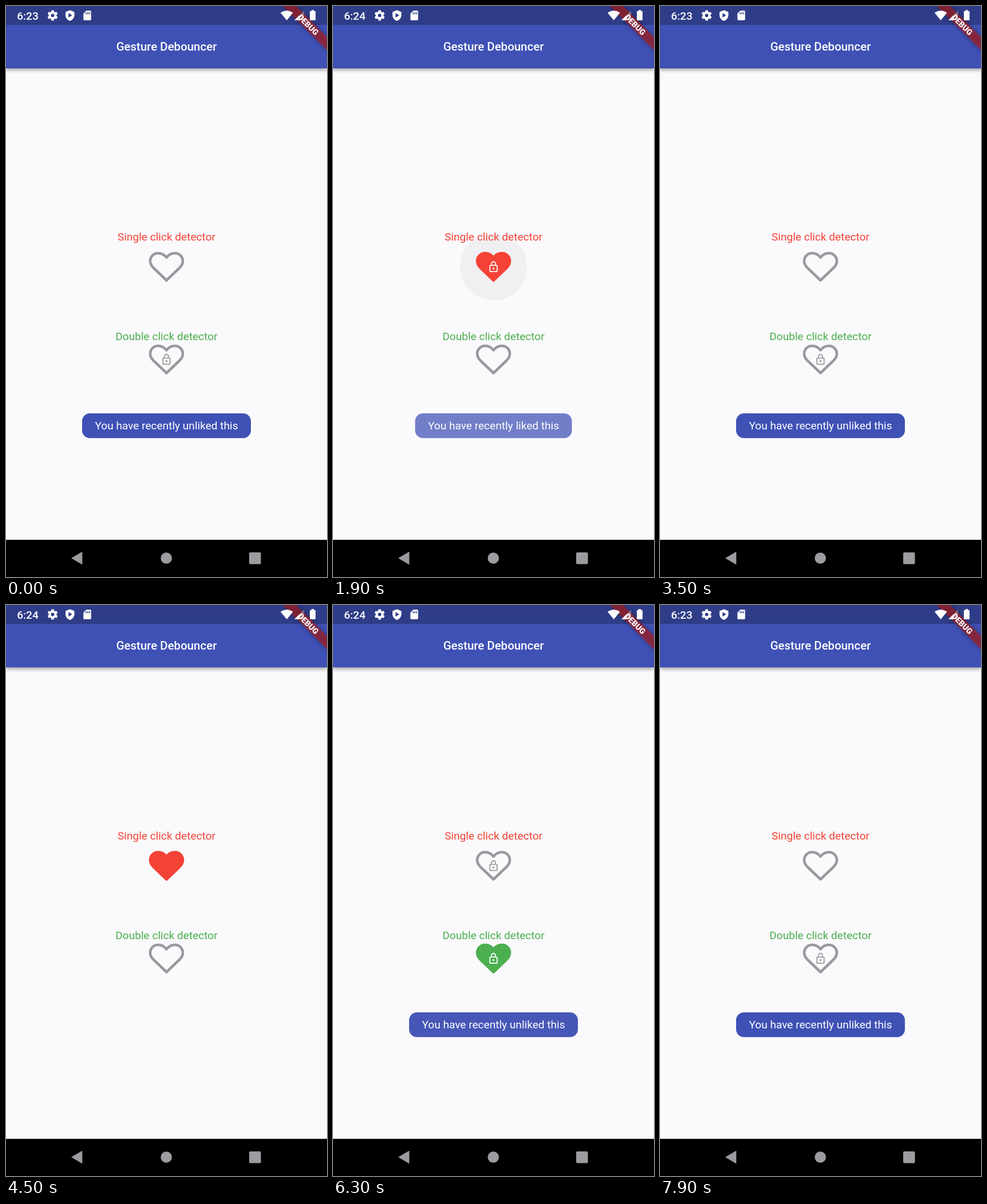
These frames come from a looping animation (561x998 px, 8 s). An HTML page:

```html
<!DOCTYPE html>
<html lang="en">
<head>
<meta charset="utf-8">
<title>Gesture Debouncer</title>
<style>
  html, body { margin: 0; width: 100%; height: 100%; overflow: hidden; background: #faf9fc; }
  svg { display: block; width: 561px; height: 998px; font-family: Roboto, sans-serif; }
  .bar { fill: #3f51b5; filter: drop-shadow(0 3px 3px rgba(0, 0, 0, .36)); }
  .title { font-size: 20.45px; font-weight: 500; }
  .clock { font-size: 19.09px; font-weight: 500; }
  .label { font-size: 19.09px; }
  .mid { text-anchor: middle; }
  .white { fill: #fff; }
  .heart { stroke-width: 4.6; stroke-linejoin: round; }
  .lock { fill: none; stroke: currentColor; stroke-width: 2; }
  .lock circle { fill: currentColor; stroke: none; }
  .ribbon { fill: #b71c1c; fill-opacity: .63; filter: drop-shadow(0 0 4px rgba(0, 0, 0, .55)); }
  .debug { font-size: 13.9px; font-weight: 900; fill: #fff; }
</style>
</head>
<body>
<svg viewBox="0 0 561 998">
  <defs>
    <path id="heart" d="M0 23.5L-23 1.5C-27 -2.6 -28.5 -6 -28.5 -10C-28.5 -18.5 -22 -24 -14.5 -24C-8 -24 -3.6 -21 0 -16.5C3.6 -21 8 -24 14.5 -24C22 -24 28.5 -18.5 28.5 -10C28.5 -6 27 -2.6 23 1.5Z"/>
    <g id="lock" class="lock" transform="scale(.9) translate(-12 -12)">
      <rect x="5" y="9" width="14" height="12" rx="1"/>
      <path d="M8 8.5V6a4 4 0 0 1 8 0v2.5"/>
      <circle cx="12" cy="15" r="2"/>
    </g>
    <clipPath id="stage"><rect width="561" height="998"/></clipPath>
  </defs>

  <rect width="561" height="998" fill="#faf9fc"/>
  <rect class="bar" width="561" height="109"/>
  <rect width="561" height="33" fill="#2f3d88"/>
  <text class="title mid white" x="280.5" y="78">Gesture Debouncer</text>

  <circle id="ripple" cx="280.5" cy="456" fill="#000"/>
  <text class="label mid" x="280.5" y="410" fill="#f44336">Single click detector</text>
  <text class="label mid" x="280.5" y="583.7" fill="#4caf50">Double click detector</text>
  <g id="single" transform="translate(280.5 456)">
    <use href="#heart" class="heart"/><use href="#lock"/>
  </g>
  <g id="double" transform="translate(280.5 618)">
    <use href="#heart" class="heart"/><use href="#lock"/>
  </g>

  <g id="toast">
    <rect y="712" height="43.3" rx="13.6" fill="#3f51b5"/>
    <text class="label mid white" x="280.5" y="740.3"></text>
  </g>

  <!-- debug ribbon -->
  <g clip-path="url(#stage)">
    <g transform="translate(561 0) rotate(45)">
      <rect class="ribbon" x="-56" y="38.2" width="112" height="16.4"/>
      <text class="debug mid" y="51.3">DEBUG</text>
    </g>
  </g>

  <!-- status bar -->
  <text id="clock" class="clock white" x="19.2" y="24"></text>
  <g class="white">
    <g transform="translate(81.5 16.5)">
      <g id="teeth"></g>
      <circle r="4.9" fill="none" stroke="#fff" stroke-width="4"/>
    </g>
    <path d="M111.7 7.3L119.5 10.6V16C119.5 20.6 116.2 24.7 111.7 26C107.200 24.700 104 20.600 104 16V10.600Z"/>
    <path d="M109.300 12.300V20.300L115.600 16.300Z" fill="#2f3d88"/>
    <path d="M140.500 8H147A1.700 1.700 0 0 1 148.700 9.700V23.300A1.700 1.700 0 0 1 147 25H137A1.700 1.700 0 0 1 135.300 23.300V13.200Z"/>
    <path d="M140 11v3.500M143 11v3.500M146 11v3.500" stroke="#2f3d88" stroke-width="1.500"/>
    <path d="M479.800 11.700Q490.700 4.300 501.600 11.700L490.700 25Z"/>
    <path d="M521 8V25H504Z" fill-opacity=".3"/>
    <path d="M513 16V25H504Z"/>
    <path d="M533.800 9V7H538.200V9H540Q541 9 541 10V24Q541 25 540 25H532Q531 25 531 24V10Q531 9 532 9Z"/>
  </g>

  <!-- navigation bar -->
  <rect y="933" width="561" height="65"/>
  <g fill="#9d9b9f">
    <path d="M114 965L133.300 953.800V976.400Z"/>
    <circle cx="280.200" cy="965" r="9.800"/>
    <rect x="425" y="955" width="20.500" height="20.500" rx="2"/>
  </g>
</svg>
<script>
const LOOP = 8000, STEP = 100, FADE = 275;
const GRAY = '#9b999d', RED = '#f44336', GREEN = '#4caf50';
const $ = id => document.getElementById(id);
const clamp = v => Math.max(0, Math.min(1, v));
const between = (t, from, to) => t >= from && t < to;
const LIKED = { text: 'You have recently liked this', width: 274 };
const UNLIKED = { text: 'You have recently unliked this', width: 295 };

$('teeth').innerHTML = Array.from({ length: 6 }, (_, i) =>
  `<rect x="-2.3" y="-9" width="4.600" height="5" rx=".6" transform="rotate(${i * 60})"/>`).join('');

const toasts = [
  { kind: LIKED, from: 1700, to: 3900 },
  { kind: LIKED, from: 4600, to: 6036 },
  { kind: UNLIKED, from: 6036, to: 9000 }
];

const idle = {
  clock: '6:23', single: { fill: 'none', lock: false }, double: { fill: 'none', lock: true },
  kind: UNLIKED, alpha: 1, radius: 0, shade: 0
};

function liveState(t) {
  const toast = toasts.find(m => between(t, m.from, m.to));
  return {
    clock: '6:24',
    single: {
      fill: between(t, 1700, 6036) ? RED : 'none',
      lock: between(t, 1700, 4000) || t >= 6036
    },
    double: { fill: t >= 4600 ? GREEN : 'none', lock: t >= 4600 },
    kind: toast ? toast.kind : LIKED,
    alpha: toast ? clamp(Math.min(t - toast.from, toast.to - t) / FADE) : 0,
    radius: 58.5 * clamp((t - 1700) / 200),
    shade: .038 * clamp((2200 - t) / 300)
  };
}

function drawHeart(id, { fill, lock }) {
  const [heart, icon] = $(id).children;
  const solid = fill !== 'none';
  heart.setAttribute('fill', fill);
  heart.setAttribute('stroke', solid ? fill : GRAY);
  icon.style.color = solid ? '#fff' : GRAY;
  icon.style.display = lock ? '' : 'none';
}

function draw(s) {
  $('clock').textContent = s.clock;
  drawHeart('single', s.single);
  drawHeart('double', s.double);
  const [box, label] = $('toast').children;
  box.setAttribute('x', 280.5 - s.kind.width / 2);
  box.setAttribute('width', s.kind.width);
  label.textContent = s.kind.text;
  $('toast').setAttribute('opacity', s.alpha);
  $('ripple').setAttribute('r', s.radius);
  $('ripple').setAttribute('opacity', s.shade);
}

// The picture flickers between the idle screen and the live one every 105 ms.
function tick() {
  const step = Math.floor(performance.now() % LOOP / STEP);
  const live = step >= 10 && step * 10 % 21 <= 10;
  draw(live ? liveState(step * STEP) : idle);
  requestAnimationFrame(tick);
}
tick();
</script>
</body>
</html>
```
